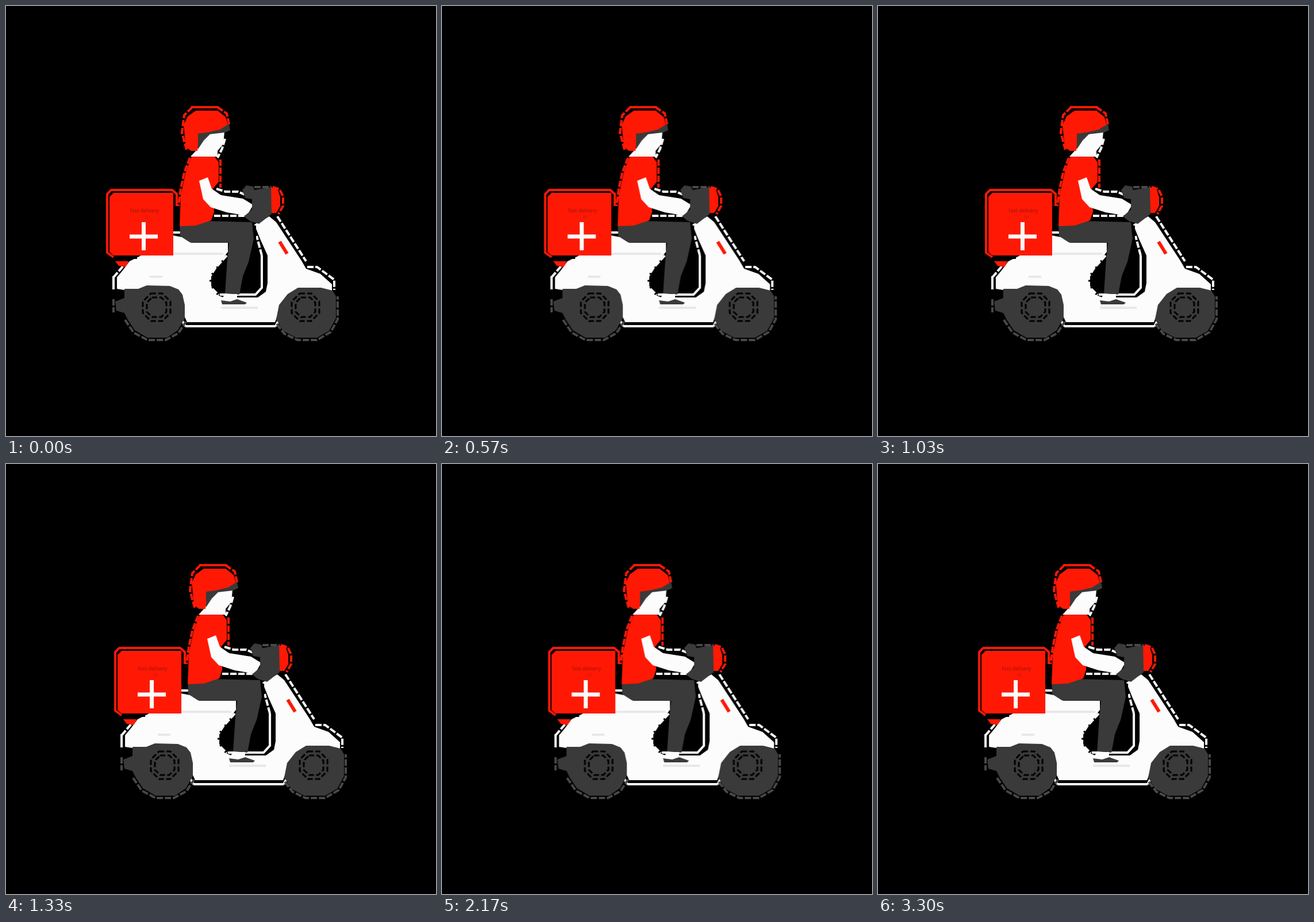
Write an HTML page that moves like this. It is 748 px wide and 748 px high and loops after 3.33 s.

```html
<!DOCTYPE html>
<html lang="en">
<head>
<meta charset="utf-8">
<title>Scooter courier</title>
<style>
  html, body { margin: 0; width: 100%; height: 100%; overflow: hidden; background: #000; }
  svg { display: block; width: 100%; height: 100%; }
  .red { fill: #ff1905; }
  .dark { fill: #393a39; }
  .white { fill: #fcfcfc; }
  .line { fill: none; stroke-width: 4; stroke: #fcfcfc; }
  .line.r { stroke: #ff1905; }
  .line.g { stroke: #484948; }
  .line.k { stroke: #000; }
  .dash { stroke-dasharray: 11 3; }
  .faint { fill: none; stroke: #e8e8e8; stroke-width: 4; }
  text { font: 9px "Open Sans", sans-serif; fill: #7c1008; text-anchor: middle; }
  #ride { animation: sway 3330ms linear infinite; }
  @keyframes sway {
    0% { transform: translateX(0); }
    6% { transform: translateX(-2px); }
    13.5% { transform: translateX(-.5px); }
    17.1% { transform: translateX(3.5px); }
    24.9% { transform: translateX(10.5px); }
    39.9% { transform: translateX(14px); }
    48% { transform: translateX(14.3px); }
    65.2% { transform: translateX(10.5px); }
    77.2% { transform: translateX(2.5px); }
    82.6% { transform: translateX(.5px); }
    100% { transform: translateX(0); }
  }
</style>
</head>
<body>
<svg viewBox="0 0 748 748">
  <defs>
    <g id="hub" class="line k" stroke-dasharray="9 4">
      <path d="M-10 -24H10L24 -10V10L10 24H-10L-24 10V-10Z" stroke-width="3"/>
      <path d="M-8 -17H8L17 -8V8L8 17H-8L-17 8V-8Z" stroke-width="3"/>
    </g>
  </defs>
  <g id="ride">
    <!-- scooter body -->
    <path class="white" d="M235 434H290V399L306 402 320 411H386V432L366 454 354 470V485L366 502 378 507H438L452 497 455 482V434L442 405 432 380 458 366 470 376 514 443 522 457 547 466 567 484V496L500 500 478 522 468 550H315L306 530 245 500 193 492V472L203 460 215 444Z"/>
    <path d="M384 430L366 456 360 470V485L369 499 378 503H436L446 494 449 482V434L440 404 430 380Z"/>
    <path class="line dash" d="M384 434L364 456 355 470V488L370 503"/>
    <path class="line" d="M372 502H434L445 490V434"/>
    <path class="line dash" d="M445 434L436 400"/>
    <path class="line" d="M312 557H469M187 493V470M290 394H304"/>
    <path class="line dash" d="M187 472L205 451M469 557L478 540M312 557L305 545M472 366L522 444M524 454H541L571 476V494"/>
    <path class="faint" d="M290 431H378M250 471H272M374 525H438"/>
    <path d="M476 410L489 431" fill="none" stroke="#ff1905" stroke-width="6"/>

    <!-- wheels -->
    <path class="dark" d="M206 492L230 492 245 486 285 487 300 493 307 502 311 520V543L299 564 280 577H246L224 564 212 546 206 534 192 530 190 514 206 508Z"/>
    <path class="line g dash" d="M207 546L222 568 246 581H278L300 569 313 549M187 510V533"/>
    <path class="dark" d="M470 545L475 520 490 501 508 490H548L568 495 574 505V543L562 565 541 577H505L482 565Z"/>
    <path class="line g dash" d="M471 553L484 570 507 581H541L565 567 577 545V505"/>
    <use href="#hub" x="262" y="524"/>
    <use href="#hub" x="521" y="524"/>

    <!-- box -->
    <path class="red" d="M190 444H214L208 454 196 452Z"/>
    <path class="red" d="M180 332L187 325H291V434H187L180 428Z"/>
    <path class="line r" d="M187 437L176 429V327L183 320H289L297 327V348"/>
    <path class="line k" d="M190 438H228"/>
    <text x="241" y="359" opacity=".75">fast delivery</text>
    <text x="246" y="370" opacity=".4">to</text>
    <path d="M215 401H264M239.500 376V425" fill="none" stroke="#fcfcfc" stroke-width="7"/>

    <!-- rider -->
    <path class="dark" d="M302 380L345 374 428 376 431 405 422 445 412 470 406 502 381 500 385 440 388 412H322L303 400Z"/>
    <path class="line k" d="M360 371H428M433 382V405L426 445"/>
    <path class="line dash" d="M362 365H415"/>
    <path class="white" d="M380 501H402V510H376Z"/>
    <path class="dark" d="M374 512L390 514 402 510 419 516 416 519H376Z"/>
    <path class="red" d="M323 262H363L370 272V306L360 318 362 358 357 373 330 382 302 383 304 330 313 288Z"/>
    <path class="line r dash" d="M373 267V316M320 264L310 290 304 318 300 348"/>
    <path class="white" d="M336 304L351 298 358 318 374 329 412 335 430 346 419 365 384 359 356 350 343 336Z"/>
    <path class="line dash" d="M366 318L382 323H404L415 328"/>
    <path class="white" d="M350 222L380 219 378 240 368 252V262H321L332 250 338 240Z"/>
    <path class="line dash" d="M381 231L376 248 368 264"/>
    <path class="red" d="M309 207L316 192 330 182H368L382 193 386 207 374 215 350 221 336 225 333 252H322L313 246Z"/>
    <path class="line r" d="M322 176H370"/>
    <path class="line r dash" d="M314 250L306 220 310 190 324 176M368 176L384 187 388 206"/>
    <path class="dark" d="M334 222L350 220 372 215 388 205 390 216 381 220 355 223 344 234 334 249Z"/>

    <!-- handlebar and lamp -->
    <path class="dark" d="M411 320L418 312 430 314 432 320 462 315V362L440 379 424 374 414 366 428 354V336L416 334Z"/>
    <path class="red" d="M461 315L473 320 477 332V348L470 360H462Z"/>
    <path class="line r dash" d="M464 315L476 319 482 331V348L474 362"/>
    <path class="line g dash" d="M432 315H462"/>
  </g>
</svg>
</body>
</html>
```
